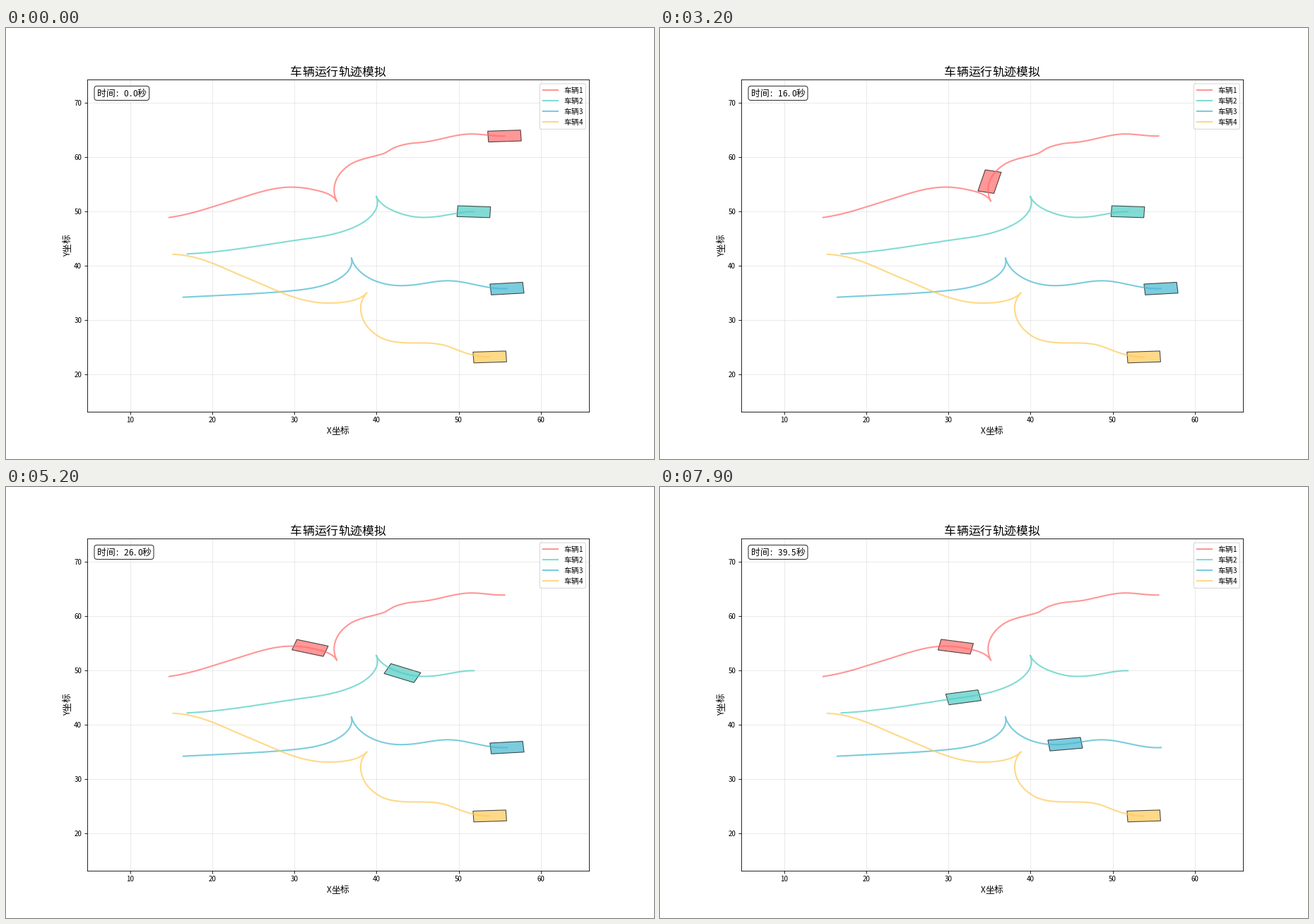
Animation, 917 px wide and 611 px high, one loop 8000 ms. Source, as a matplotlib script:

```python
import numpy as np
import matplotlib.pyplot as plt
from matplotlib.animation import FuncAnimation
from matplotlib.patches import FancyBboxPatch, Polygon

W, H, DPI = 917, 611, 76.4
PT = DPI / 72
FRAMES, INTERVAL = 80, 100
XLIM, YLIM = (4.75, 65.89), (13.19, 74.24)
LEFT, TOP, AX_W, AX_H = 0.125 * W, 0.12 * H, 0.775 * W, 0.77 * H
CAR_L, CAR_W = 4, 2
SUB = 60  # curve samples between two poses

plt.rcParams["font.family"] = "Noto Sans CJK JP"

# Each car backs up through the first poses, halts at the last of them and
# drives forward through the rest. Pose: x, y, heading in degrees, and the
# frame at which the car is there, if it matters for the timing.
ROUTES = [
    ("#FF6B6B",
     [(55.58, 63.88, 2.8, 1), (51.58, 64.26, 0), (45.22, 62.69, 5),
      (42.21, 61.77, 31, 18), (40.74, 60.59, 25), (36.73, 58.59, 45, 27),
      (35.17, 51.86, 108, 40)],
     [(32.63, 53.91, 163, 46), (31.46, 54.27, 168, 59),
      (30.89, 54.37, 169, 79), (22.42, 51.98, 205), (14.76, 48.9, 192)]),
    ("#4ECDC4",
     [(51.84, 49.96, -2.8, 40), (47.65, 49.12, 11.4, 46), (45.69, 48.91, 0),
      (42.03, 50.14, -33, 54), (39.96, 52.79, -74, 61.5)],
     [(37.82, 47.51, -142, 71), (31.83, 45.06, -168.7, 79),
      (16.96, 42.2, -176)]),
    ("#45B7D1",
     [(55.88, 35.82, 4.7, 64.5), (51.5, 36.7, -18, 71), (48.66, 37.26, 0),
      (44.22, 36.45, 7.4, 79), (42.98, 36.36, 0), (36.94, 41.47, -80)],
     [(34.03, 36.65, -152), (30.16, 35.49, -171), (16.48, 34.23, -175)]),
    ("#FECA57",
     [(53.79, 23.24, 2.7, 83), (48.92, 25.07, -31, 90), (45.65, 25.81, 0),
      (40.31, 26.97, -42), (38.07, 32.23, -90), (38.83, 35.05, -121)],
     [(34.12, 33.15, -180), (24.57, 37.55, -211), (15.24, 42.12, -183)]),
]


def unit(angle):
    return np.array([np.cos(angle), np.sin(angle)])


def arc(a, b, way):
    """Cubic from pose a to pose b, close to a circle where one fits."""
    p, q = np.array(a[:2]), np.array(b[:2])
    ta, tb = np.radians(a[2]), np.radians(b[2])
    reach = way * np.hypot(*(q - p)) * 2 / (1 + np.cos((tb - ta) / 2))
    u, v = reach * unit(ta), reach * unit(tb)
    t = np.linspace(0, 1, SUB, endpoint=False)[:, None]
    pos = (p + (q - p) * t**2 * (3 - 2 * t)
           + u * t * (1 - t)**2 - v * t**2 * (1 - t))
    vel = (6 * (q - p) * t * (1 - t)
           + u * (1 - t) * (1 - 3 * t) - v * t * (2 - 3 * t))
    return pos, np.arctan2(*(way * vel).T[::-1])


def ease(t, s, halt):
    """Monotone cubic s(t) for every frame, at rest at the start and at halt."""
    h = np.diff(t)
    d = np.diff(s) / h
    v = np.r_[0, 2 * d[:-1] * d[1:] / (d[:-1] + d[1:]), d[-1]]
    v[halt] = 0
    x = np.clip(np.arange(FRAMES), t[0], t[-1])
    j = np.clip(np.searchsorted(t, x, "right") - 1, 0, len(h) - 1)
    f = (x - t[j]) / h[j]
    return (s[j] * (1 + 2 * f) * (1 - f)**2 + s[j + 1] * f**2 * (3 - 2 * f)
            + h[j] * (v[j] * f * (1 - f)**2 - v[j + 1] * f**2 * (1 - f)))


class Car:
    def __init__(self, ax, color, back, fore):
        poses, turn = back + fore, len(back) - 1
        arcs = [arc(a, b, -1 if i < turn else 1)
                for i, (a, b) in enumerate(zip(poses, poses[1:]))]
        self.path = np.vstack([p for p, _ in arcs] + [poses[-1][:2]])
        self.angle = np.concatenate([a for _, a in arcs])
        steps = np.hypot(*np.diff(self.path, axis=0).T)
        self.dist = np.r_[0, np.cumsum(steps)]
        timed = np.array([i for i, p in enumerate(poses) if len(p) > 3])
        times = np.array([poses[i][3] for i in timed])
        self.run = ease(times, self.dist[timed * SUB], timed == turn)
        ax.plot(*self.path.T, color=color, lw=2, alpha=0.7)
        self.body = ax.add_patch(Polygon(np.zeros((4, 2)), facecolor=color,
                                         edgecolor="black", lw=1, alpha=0.7))

    def move(self, i):
        s = self.run[i]
        center = [np.interp(s, self.dist, c) for c in self.path.T]
        a = self.angle[np.abs(self.dist[:-1] - s).argmin()]
        along = CAR_L / 2 * unit(a)
        side = CAR_W / 2 * unit(a + np.pi / 2)
        self.body.set_xy([center + along + side, center + along - side,
                          center - along - side, center - along + side])


def cells(text, size):
    """Half-width Latin, full-width Han: (char, offset, font size) and width."""
    em, x, out = size * PT, 0, []
    for ch in text:
        wide = ord(ch) > 255
        step = em if wide else em / 2
        out.append((ch, x + step / 2, size if wide else size * 0.92))
        x += step
    return out, x


def label(x, y, text, size, upright=False):
    drop = 0.38 * size * PT
    for ch, dx, fs in cells(text, size)[0]:
        px, py = (x + drop, y - dx) if upright else (x + dx, y + drop)
        ui.text(px, py, ch, fontsize=fs, ha="center", va="baseline",
                rotation=90 if upright else 0, rotation_mode="anchor")


fig = plt.figure(figsize=((W + 1e-6) / DPI, (H + 1e-6) / DPI), dpi=DPI)
ax = fig.add_axes([0.125, 0.11, 0.775, 0.77])
ax.set(xlim=XLIM, ylim=YLIM, xticks=range(10, 70, 10), yticks=range(20, 80, 10))
ax.tick_params(labelsize=9.2)
ax.grid(True, alpha=0.3)
cars = [Car(ax, *route) for route in ROUTES]

# Overlay in stage pixels for all lettering
ui = fig.add_axes([0, 0, 1, 1])
ui.set(xlim=(0, W), ylim=(H, 0))
ui.axis("off")

cx, cy = LEFT + AX_W / 2, TOP + AX_H / 2
for text, size, y in (("车辆运行轨迹模拟", 16, 61.5), ("X坐标", 12, 570)):
    label(cx - cells(text, size)[1] / 2, y, text, size)
label(86, cy + cells("Y坐标", 12)[1] / 2, "Y坐标", 12, upright=True)

ui.add_patch(FancyBboxPatch((755.3, 79), 65, 64.4, facecolor="white",
                            edgecolor="0.8", lw=1, alpha=0.8,
                            boxstyle="round,pad=0,rounding_size=2.1"))
for n, route in enumerate(ROUTES):
    y = 87.6 + 15.15 * n
    ui.plot([759.8, 781], [y + 0.3] * 2, color=route[0], lw=2, alpha=0.7)
    label(789.3, y, f"车辆{n + 1}", 10)

CLOCK_X, CLOCK_Y, CLOCK_SIZE = 128.8, 92.4, 12
clock_box = ui.add_patch(FancyBboxPatch(
    (CLOCK_X, CLOCK_Y - 6.3), 70, 12.6, boxstyle="round,pad=3.8",
    facecolor="white", edgecolor="black", lw=1, alpha=0.8))
clock = [ui.text(0, CLOCK_Y + 0.38 * CLOCK_SIZE * PT, "", ha="center",
                 va="baseline") for _ in range(9)]


def update(i):
    for car in cars:
        car.move(i)
    chars, width = cells(f"时间: {i * 0.5:.1f}秒", CLOCK_SIZE)
    clock_box.set_width(width)
    for t in clock:
        t.set_text("")
    for t, (ch, dx, fs) in zip(clock, chars):
        t.set_text(ch)
        t.set_x(CLOCK_X + dx - (1 if ch in ":." else 0))
        t.set_fontsize(fs)
    return []


anim = FuncAnimation(fig, update, frames=FRAMES, interval=INTERVAL,
                     init_func=lambda: update(0), repeat=True, repeat_delay=0)
plt.show()
```
